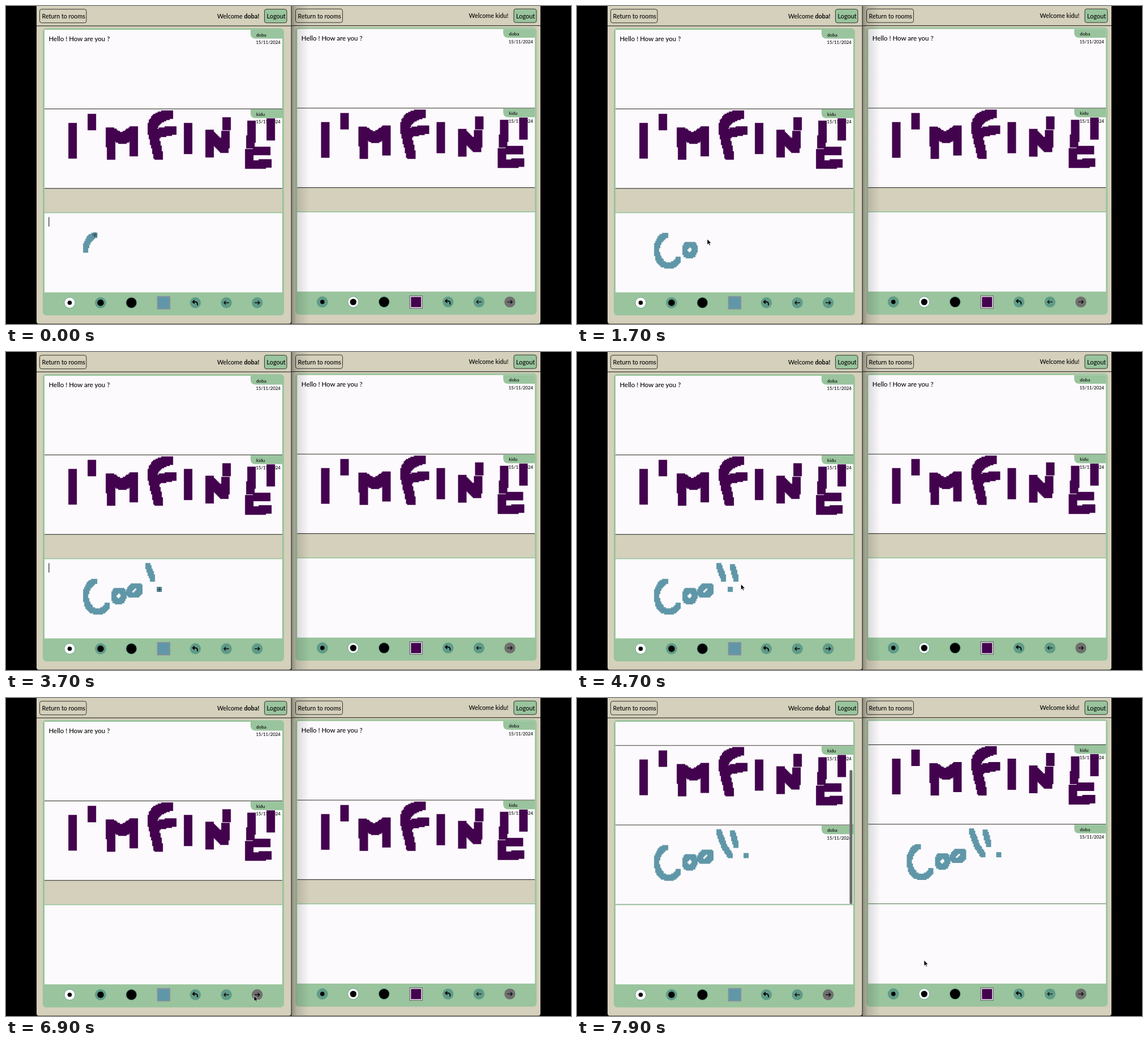
An HTML page for the animation above (8000 ms loop, 998 px wide and 561 px high).

```html
<!DOCTYPE html>
<html lang="en">
<head>
<meta charset="utf-8">
<title>Shared drawing chat</title>
<style>
html, body { margin: 0; width: 100%; height: 100%; overflow: hidden; background: #000; }
svg { display: block; width: 100vw; height: 100vh; }
text { font-family: Lato, sans-serif; font-weight: 500; fill: #050505; white-space: pre; }
</style>
</head>
<body>
<svg id="stage" viewBox="0 0 998 561" preserveAspectRatio="none"></svg>
<script>
const LOOP = 8000, SENT = 6800, POSTED = 6950, LAG = 150;
const SCROLL = 97.7, ROW = 140.2, PAD_Y = 365.4;
const C = {
  beige: '#d4d0bb', green: '#99c49d', paper: '#fcfafc', teal: '#609b88',
  purple: '#43024e', blue: '#6097a8', grey: '#706f70', line: '#35352f'
};
const USER = { left: 'doba', right: 'kidu' };
const SIDES = ['left', 'right'];

// Freehand ink: square stamps along a polyline, snapped to a coarse grid.
function sample(pts) {
  return pts.flatMap(([x, y], i) => {
    const [px, py] = pts[Math.max(0, i - 1)];
    const n = Math.max(1, Math.ceil(Math.hypot(x - px, y - py) / 1.5));
    return Array.from({ length: n }, (_, k) => {
      const u = (k + 1) / n;
      return [px + (x - px) * u, py + (y - py) * u];
    });
  });
}
function stamps(points, size) {
  const snap = v => Math.round((v - size / 2) / 2) * 2 + 0.2;
  return [...new Set(points.map(([x, y]) => `M${snap(x)} ${snap(y)}h${size}v${size}h-${size}z`))].join('');
}
// Elliptic arc from angle a to b; tilt lifts its right side.
function arc(cx, cy, rx, ry, a, b, tilt = 0) {
  return Array.from({ length: 25 }, (_, i) => {
    const w = a + (b - a) * i / 24, dx = rx * Math.cos(w);
    return [cx + dx, cy + ry * Math.sin(w) - tilt * dx];
  });
}
const ring = (cx, cy, rx, ry, tilt) => arc(cx, cy, rx, ry, -1.6, -1.6 - 2 * Math.PI, tilt);
const line = (x1, y1, x2, y2) => [[x1, y1], [x2, y2]];
const stem = (x, top, bottom) => line(x, top, x, bottom);

const letters = {
  I: [stem(117, 214, 262), stem(150.5, 197, 212)],
  M: [line(184, 221, 185, 264), [[184, 222], [205, 235], [226, 220], [225, 257]]],
  F: [[...arc(288, 218, 30, 26, -Math.PI / 2, -Math.PI), [269, 264]], line(264, 225, 294, 219)],
  i: [stem(322, 214, 254)],
  N: [stem(359, 226, 260), [[359, 228], [386, 251], [388, 227]], stem(389, 203, 211)],
  E: [line(434, 209, 432, 243), line(444, 255, 460, 255), [[430, 260], [430, 280], [461, 278]], stem(468, 205, 230)]
};
const fineInk = Object.values(letters).flat().map(p => stamps(sample(p), 15)).join('');

// Pen strokes: press time, release time, path.
const strokes = [
  [-150, 270, arc(162, 430.5, 21.5, 27.5, -1.8, -5.63)],
  [750, 1300, ring(199, 430, 8.8, 10, 0.15)],
  [1850, 2350, ring(227, 420.5, 9.7, 8.2, 0.3)],
  [2700, 3050, line(250, 376, 259, 401)],
  [3500, 3700, [[271, 419]]],
  [4000, 4300, line(274.5, 378, 281, 400)],
  [4800, 4950, [[298, 419]]],
  [5900, 6150, line(259, 401, 270, 418)]
].map(([a, b, pts]) => ({ a, b, pts: sample(pts) }));
const allInk = stamps(strokes.flatMap(s => s.pts), 9);

// Where the pointer rests between strokes, joined with the stroke ends.
const stops = [
  [1550, 230, 411], [5550, 343, 437], [6750, 438, 525], [7100, 252.5, 319.5], [7750, 613, 462.5],
  ...strokes.flatMap(s => [[s.a, ...s.pts[0]], [s.b, ...s.pts.at(-1)]])
].sort((p, q) => p[0] - q[0]);

const clamp = v => Math.min(1, Math.max(0, v));
function drawn({ a, b, pts }, t) {
  return t < a ? [] : pts.slice(0, Math.max(1, Math.round(pts.length * clamp((t - a) / (b - a)))));
}
function pointer(t) {
  const s = strokes.find(s => t >= s.a && t < s.b);
  if (s) return { pen: true, at: drawn(s, t).at(-1) };
  const i = stops.findIndex(p => p[0] > t);
  if (i < 0) return { at: stops.at(-1).slice(1) };
  const [t0, x0, y0] = stops[i - 1], [t1, x1, y1] = stops[i];
  const u = clamp((t - t0) / (t1 - t0)), e = u * u * (3 - 2 * u);
  return { at: [x0 + (x1 - x0) * e, y0 + (y1 - y0) * e] };
}

// Markup helpers
const rect = (x, y, w, h, fill, more = '') => `<rect x="${x}" y="${y}" width="${w}" height="${h}" fill="${fill}" ${more}/>`;
const text = (x, y, size, str) => `<text x="${x}" y="${y}" font-size="${size}">${str}</text>`;
const disc = (x, r, fill, more = '') => `<circle cx="${x}" cy="523.5" r="${r}" fill="${fill}" ${more}/>`;
const icon = (x, d, width = 1.3) =>
  `<path d="${d}" transform="translate(${x} 523.5)" fill="none" stroke="#0a0a0a" stroke-width="${width}"/>`;
const button = (x, y, w, label, fill, size) =>
  rect(x, y, w, 24, fill, `rx="3.5" stroke="${C.line}"`) + text(x + 4, y + 16.3, size, label);

function message(row, author, body) {
  return `<g transform="translate(0 ${42 + row * ROW})">${rect(68, 0, 420, ROW, C.paper)}
    ${text(441.5, 25.2, 7.8, '15/11/2024')}${body}
    <path d="M432 0H488V15.5H441Q432 15.5 432 7Z" fill="${C.green}"/>
    ${text(442, 11.5, 8.2, author)}
    ${rect(68, 139, 420, 1.2, C.line)}</g>`;
}

function toolbar(pen, ink, side) {
  const left = side === 'left';
  const swatch = left
    ? rect(267.5, 512.5, 22, 22, ink, 'stroke="#8d8f9a" stroke-width="1.5"')
    : rect(267, 512.7, 22, 22, '#f4eef4', 'stroke="#55505a"') + rect(269, 514.7, 18, 18, ink);
  const pens = [0, 1, 2].map(i => {
    const x = 112.5 + 54.5 * i;
    return disc(x, 9.5, i === pen ? '#fff' : C.teal, `stroke="${C.teal}" stroke-width=".8"`) +
      disc(x, [3.8, 5.7, 8.9][i], '#000');
  });
  return pens.join('') + swatch +
    disc(334.5, 9.7, C.teal) + disc(389.2, 9.7, C.teal) +
    disc(443.7, 9.7, left ? C.teal : C.grey, `id="send-${side}"`) +
    icon(334.5, 'M-4 -1.5H.5Q4.5 -1 3.5 4.5M-1.5 -4.5L-4.5 -1.5L-1.5 1.5', 2) +
    icon(389.2, 'M4.5 0H-4M-1 -3.2L-4.2 0L-1 3.2') +
    icon(443.7, 'M-4.5 0H4M1 -3.2L4.2 0L1 3.2');
}

function panel(side, pen, ink) {
  const art = (d, top, fill) => `<path d="${d}" transform="translate(0 ${-top})" fill="${fill}"/>`;
  return rect(65, 39.2, 426, 506.6, C.green, 'rx="6"') + rect(68, 42, 420, 321.8, C.beige) +
    `<g clip-path="url(#list)"><g id="feed-${side}">
      ${message(0, USER.left, text(75.5, 20, 11.5, 'Hello ! How are you ?'))}
      ${message(1, USER.right, art(fineInk, 42 + ROW, C.purple))}
      <g id="new-${side}">${message(2, USER.left, art(allInk, PAD_Y, C.blue))}</g>
    </g></g>` +
    rect(68, PAD_Y, 420, 139.8, C.paper) + toolbar(pen, ink, side);
}

const stage = document.getElementById('stage');
stage.innerHTML = `
  <defs>
    <clipPath id="list"><rect x="68" y="42" width="420" height="321.8"/></clipPath>
    <linearGradient id="shade"><stop stop-opacity=".34"/><stop offset=".3" stop-opacity=".13"/>
      <stop offset="1" stop-opacity="0"/></linearGradient>
  </defs>
  ${rect(0, 0, 998, 561, '#000')}
  ${rect(500, -10, 444, 570.5, C.beige, 'rx="4"')}
  ${rect(500, 34, 444, 1.2, C.line)}
  ${button(511.5, 5.2, 83, 'Return to rooms', 'none', 10.7)}
  ${text(817.5, 21.3, 10.7, `Welcome ${USER.right}!`)}
  ${button(897, 5.2, 40, 'Logout', C.green, 10.9)}
  <g transform="translate(446.3 -1.4)">${panel('right', 1, C.purple)}</g>
  ${rect(504, 0, 32, 560, 'url(#shade)')}
  ${rect(502, 0, 2.6, 561, '#24231f')}
  ${rect(54, -10, 449.5, 570.5, C.beige, 'rx="4"')}
  ${rect(54, 34.5, 449.5, 1.2, C.line)}
  ${button(59.5, 5.7, 82.5, 'Return to rooms', 'none', 10.7)}
  ${text(373, 21.8, 10.8, `Welcome <tspan font-weight="700">${USER.left}!</tspan>`)}
  ${button(456.5, 5.7, 39.5, 'Logout', C.green, 10.9)}
  ${panel('left', 0, C.blue)}
  ${rect(481.5, 127, 5, 236.5, '#6c6a6c', 'rx="2.5" id="bar"')}
  <path id="ink" fill="${C.blue}"/>
  ${rect(75.3, 372.5, 1.1, 16.5, '#111', 'id="caret"')}
  <path id="arrow" d="M0 0V10.2L2.4 8L4 11.6L5.6 10.9L4.1 7.4H7.2Z" fill="#000" stroke="#fff" stroke-width=".7"/>
  <g id="cross">${rect(-4, -4, 8, 8, C.blue)}
    <path d="M-4 0H4M0 -4V4" stroke="#1f3440" stroke-width="1.1"/>
    <path d="M-3.5 -3.5H3.5V3.5H-3.5Z" fill="none" stroke="#34505e" stroke-width=".8" stroke-dasharray="2 1.5"/></g>`;

const $ = id => document.getElementById(id);
const show = (id, on) => $(id).setAttribute('visibility', on ? 'visible' : 'hidden');

function render(t) {
  const posted = t >= POSTED;
  for (const side of SIDES) {
    $('feed-' + side).setAttribute('transform', `translate(0 ${posted ? -SCROLL : 0})`);
    show('new-' + side, posted);
  }
  show('bar', posted);
  $('send-left').setAttribute('fill', t < SENT ? C.teal : C.grey);
  $('ink').setAttribute('d', t < SENT ? stamps(strokes.flatMap(s => drawn(s, t)), 9) : '');

  // Each press restarts the caret's blink.
  const press = strokes.findLast(s => s.a <= t).a;
  show('caret', t < SENT && (t - press) % 1000 < 500);

  const { pen, at: [x, y] } = pointer(t - LAG);
  show('cross', pen);
  show('arrow', !pen);
  $(pen ? 'cross' : 'arrow').setAttribute('transform', `translate(${x.toFixed(1)} ${y.toFixed(1)})`);
}

const start = performance.now();
function tick() {
  const t = Math.max(0, performance.now() - start) % LOOP;
  render(Math.floor(t / 50) * 50);
  requestAnimationFrame(tick);
}
tick();
</script>
</body>
</html>
```
